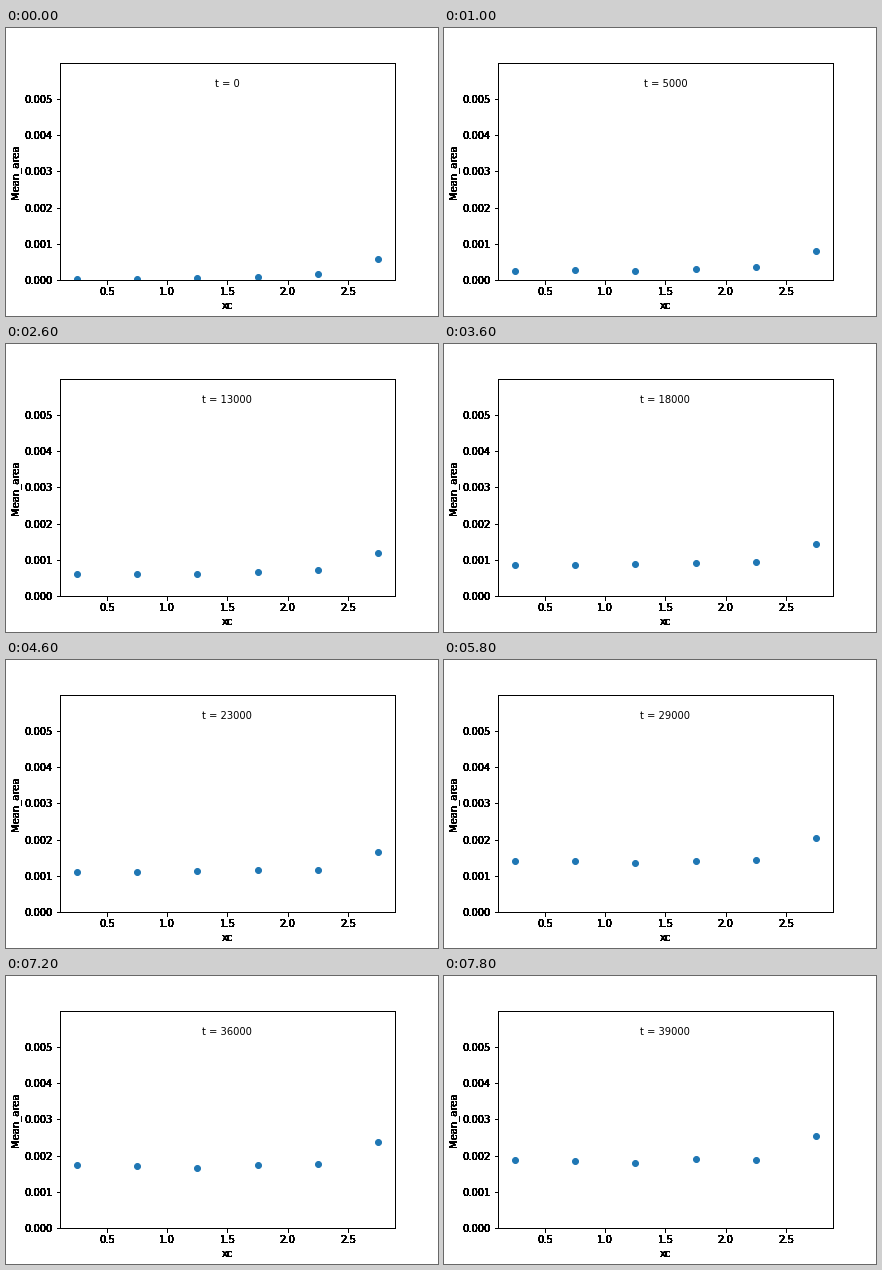
These frames come from a looping animation (432x288 px, 8000 ms). A matplotlib script:

```python
import numpy as np
import matplotlib.pyplot as plt
from matplotlib.animation import FuncAnimation

FRAMES, STEP_MS, T_STEP = 40, 200, 1000
LAYERS = 16  # stacked axes give the heavy look of ticks and labels

plt.rcParams.update({"font.family": "DejaVu Sans", "font.size": 10})
fig = plt.figure(figsize=(6, 4), dpi=72, facecolor="white")

xc = np.arange(0.25, 3, 0.5)

# Mean area in units of 1e-5 at a few times; linear growth in between
key_frames = [0, 9, 13, 23, 29, 33, 39]
key_areas = np.array([
    [4, 4, 5, 9, 16, 59],
    [43, 46, 43, 46, 51, 99],
    [60, 62, 62, 66, 71, 120],
    [110, 110, 112, 115, 115, 165],
    [140, 140, 135, 140, 143, 203],
    [159, 157, 154, 159, 165, 220],
    [187, 184, 179, 190, 187, 253],
])


def add_layer():
    ax = fig.add_axes([0.125, 0.125, 0.775, 0.755], facecolor="none")
    ax.set(xlim=(0.1115, 2.8885), ylim=(0, 0.006),
           xlabel="xc", ylabel="Mean_area")
    ax.set_xticks(np.arange(0.5, 3, 0.5))
    ax.set_yticks(np.arange(6) / 1000)
    ax.yaxis.set_major_formatter("{x:.3f}")
    return ax


ax = [add_layer() for _ in range(LAYERS)][0]
dots = ax.scatter(xc, np.zeros_like(xc), color="C0")
label = ax.text(0.5, 0.9, "", transform=ax.transAxes,
                ha="center", va="center")


def areas(frame):
    return np.array([np.interp(frame, key_frames, col)
                     for col in key_areas.T]) * 1e-5


def update(frame):
    dots.set_offsets(np.column_stack([xc, areas(frame)]))
    label.set_text(f"t = {frame * T_STEP}")
    return dots, label


anim = FuncAnimation(fig, update, frames=FRAMES, interval=STEP_MS,
                     init_func=lambda: update(0), repeat=True,
                     repeat_delay=0)
plt.show()
```
